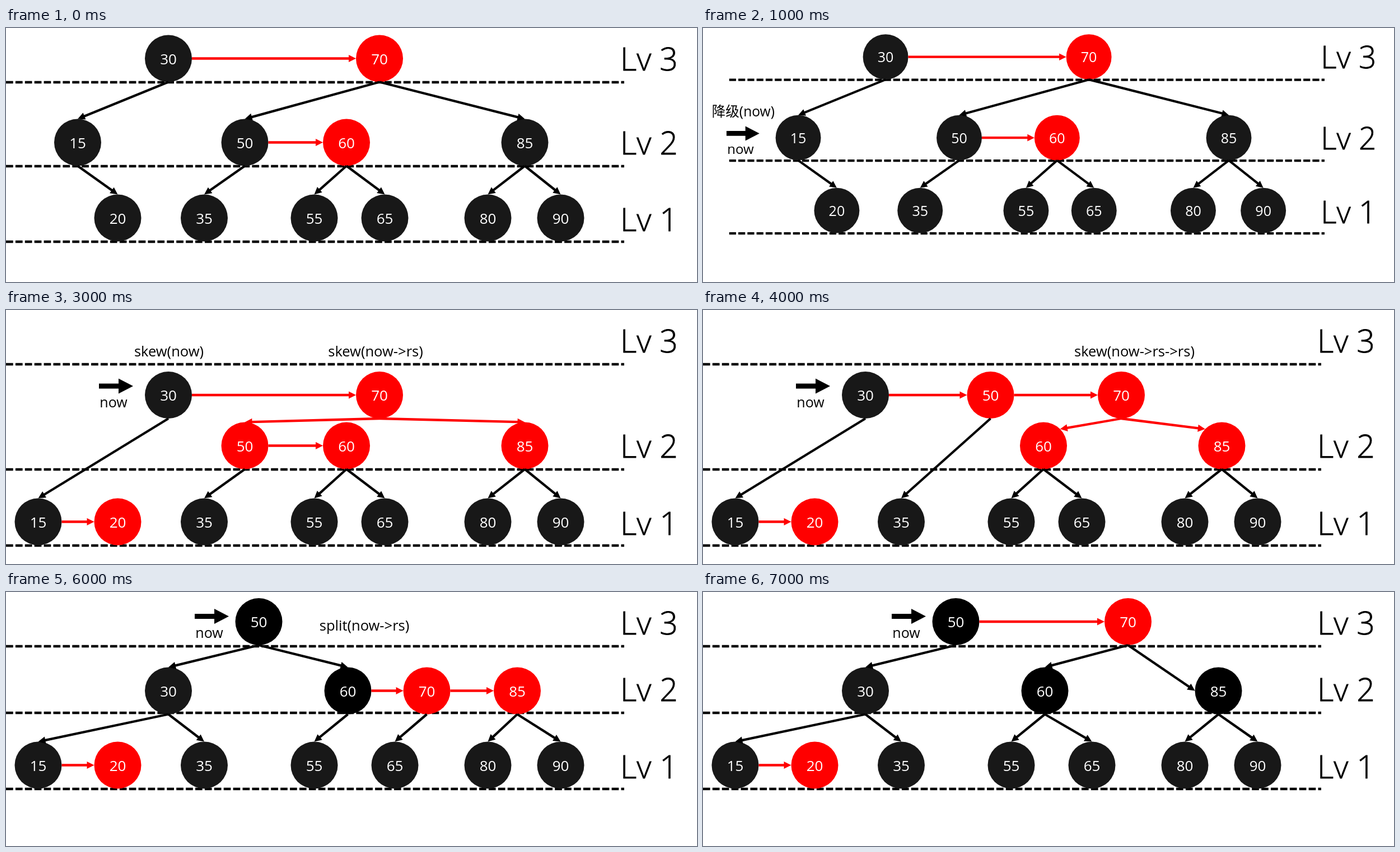
An HTML page with a canvas that plays this animation: 1234x454 px, repeating every 8 s.

```html
<!DOCTYPE html>
<html lang="zh">
<head>
<meta charset="utf-8">
<title>AA tree deletion</title>
<style>
  html, body { margin: 0; width: 100%; height: 100%; overflow: hidden; background: #fff; }
  canvas { display: block; width: 1234px; height: 454px; }
</style>
</head>
<body>
<canvas id="stage" width="1234" height="454"></canvas>
<script>
const ctx = document.getElementById('stage').getContext('2d');
const STEP = 1000, R = 42, STROKE = 4.3;
const INK = '#000', DARK = '#181818', RED = '#f00';
const FONT = '"Open Sans", "Noto Sans CJK SC", "Noto Sans CJK", "Noto Sans", sans-serif';

// Column of each key, and the columns once the middle keys spread out
const home = {
  15: 57.5, 20: 199.5, 30: 290, 35: 354, 50: 426.5, 55: 550.5,
  60: 608, 65: 676.5, 70: 667, 80: 860.5, 85: 926.5, 90: 990.5
};
const spread = { ...home, 50: 451.5, 60: 610.5, 65: 694.5, 70: 751.5, 85: 913 };

// A row lists chains of keys joined by red links (">"). A mark before a chain
// sets how its parent reaches it; unmarked chains get a black link from above.
const ENTRY = {
  '*': [RED, 't'],
  '^': [RED, 'shoulder'],
  '<': [INK, 'l']
};

const pairs = '35 55 65 80 90';
const bottom = '15>20 ' + pairs;
const start = {
  rows: ['30>70', '15 50>60 85', '20 ' + pairs],
  cols: { ...home, 15: 128 },
  lines: [97, 247, 382]
};
const lowered = { cols: home, lines: [97, 285, 421], top: 152, now: [166, 136] };
const flat = { cols: spread, lines: [97, 216, 352] };
const raised = { ...flat, top: 53, mid: 176.5, now: [337, 43.5] };

const scenes = [
  start,
  { ...start, view: [0.963, 46.8, -0.8], now: [-5, 196.5], notes: [['降级(now)', 26, 165]] },
  {
    rows: ['30>70', '50>60 85', bottom], cols: home, lines: [139.5, 289.5, 425],
    now: [166, 82], notes: [['降级(now)', 289, 33.5], ['降级(now->rs)', 660, 33.5]]
  },
  {
    ...lowered, rows: ['30>70', '*50>60 *85', bottom],
    notes: [['skew(now)', 291, 83], ['skew(now->rs)', 660, 83]]
  },
  {
    ...lowered, rows: ['30>50>70', '^60 ^85', bottom],
    cols: { ...home, 50: 513.5, 70: 747 },
    notes: [['skew(now->rs->rs)', 770.5, 83]]
  },
  {
    ...flat, rows: ['30>50>60>70>85', '', bottom], top: 152,
    now: [166, 136], notes: [['split(now)', 289, 68.5]]
  },
  { ...raised, rows: ['50', '30 60>70>85', bottom], notes: [['split(now->rs)', 640, 68.5]] },
  { ...raised, rows: ['50>70', '30 60 <85', bottom], cols: { ...spread, 70: 759, 85: 920.5 } }
];

// Search-tree parent: the nearer in depth of the two neighbours above
function parentOf(key, above) {
  const low = above.filter(n => n.key < key).sort((a, b) => b.key - a.key)[0];
  const high = above.filter(n => n.key > key).sort((a, b) => a.key - b.key)[0];
  if (!low || !high) return low || high;
  return high.row >= low.row ? high : low;
}

const wasRed = new Set();

function build(scene) {
  const { rows, cols, lines, top, mid } = scene;
  const nodes = [], links = [];
  rows.forEach((list, row) => {
    const above = [...nodes];
    const y = [top, mid][row] ?? lines[row] - R - 0.5;
    for (const chain of list.split(' ').filter(Boolean)) {
      const [tint, entry] = ENTRY[chain[0]] || [INK, 't'];
      let prev = null;
      for (const key of chain.match(/\d+/g).map(Number)) {
        const red = prev !== null || tint === RED;
        if (red) wasRed.add(key);
        const color = red ? RED : wasRed.has(key) ? INK : DARK;
        const node = { key, row, x: cols[key], y, color };
        const parent = prev || parentOf(key, above);
        if (prev) links.push([prev, 'r', node, 'l', RED]);
        else if (parent) links.push([parent, 'b', node, entry, tint]);
        nodes.push(node);
        prev = node;
      }
    }
  });
  return { ...scene, nodes, links };
}

function text(str, x, y, size, color, weight = 400) {
  ctx.font = `${weight} ${size}px ${FONT}`;
  ctx.textAlign = 'center';
  ctx.fillStyle = color;
  ctx.fillText(str, x, y);
}

function levelName(n, y) {
  const name = 'Lv ' + n;
  text(name, 1148.5, y, 57, INK, 300);
  ctx.setLineDash([]);
  ctx.strokeStyle = INK;
  ctx.lineWidth = 0.8;
  ctx.strokeText(name, 1148.5, y);
}

function polygon(points, color) {
  ctx.beginPath();
  points.forEach(([x, y]) => ctx.lineTo(x, y));
  ctx.fillStyle = color;
  ctx.fill();
}

function line(x1, y1, x2, y2, color, dash = []) {
  ctx.setLineDash(dash);
  ctx.strokeStyle = color;
  ctx.lineWidth = STROKE;
  ctx.beginPath();
  ctx.moveTo(x1, y1);
  ctx.lineTo(x2, y2);
  ctx.stroke();
}

function arrow([x1, y1], [x2, y2], color) {
  const len = Math.hypot(x2 - x1, y2 - y1);
  const ux = (x2 - x1) / len, uy = (y2 - y1) / len;
  const head = 13, half = 6.5;
  const bx = x2 - ux * head, by = y2 - uy * head;
  line(x1, y1, bx + ux, by + uy, color);
  polygon([[x2, y2], [bx - uy * half, by + ux * half], [bx + uy * half, by - ux * half]], color);
}

function site({ x, y }, side, fromX) {
  const d = R * Math.SQRT1_2;
  switch (side) {
    case 'l': return [x - R, y];
    case 'r': return [x + R, y];
    case 't': return [x, y - R];
    case 'b': return [x, y + R];
    default: return [x + d * Math.sign(fromX - x), y - d];
  }
}

function pointer([x, y]) {
  polygon([[x, y - 4.5], [x + 35, y - 4.5], [x + 35, y - 13.5], [x + 61, y],
    [x + 35, y + 13.5], [x + 35, y + 4.5], [x, y + 4.5]], INK);
  text('now', x + 26, y + 38, 25, INK);
}

function draw({ lines, nodes, links, now, notes = [], view = [1, 0, 0] }) {
  ctx.setTransform(1, 0, 0, 1, 0, 0);
  ctx.fillStyle = '#fff';
  ctx.fillRect(0, 0, 1234, 454);
  ctx.setTransform(view[0], 0, 0, view[0], view[1], view[2]);

  lines.forEach((y, i) => {
    line(0, y, 1104, y, INK, [12.7, 4.2]);
    levelName(3 - i, y - (i < 2 ? 21 : 19));
  });

  for (const { key, x, y, color } of nodes) {
    ctx.beginPath();
    ctx.arc(x, y, R, 0, Math.PI * 2);
    ctx.fillStyle = color;
    ctx.fill();
    text(key, x, y + 10, 26, '#fff');
  }

  for (const [from, out, to, into, color] of links) {
    arrow(site(from, out), site(to, into, from.x), color);
  }

  if (now) pointer(now);
  for (const [str, x, y] of notes) text(str, x, y, 25.5, INK);
}

const steps = scenes.map(build);
const t0 = performance.now();
function tick() {
  const t = Math.max(0, performance.now() - t0);
  draw(steps[Math.floor(t / STEP) % steps.length]);
  requestAnimationFrame(tick);
}
tick();
</script>
</body>
</html>
```
